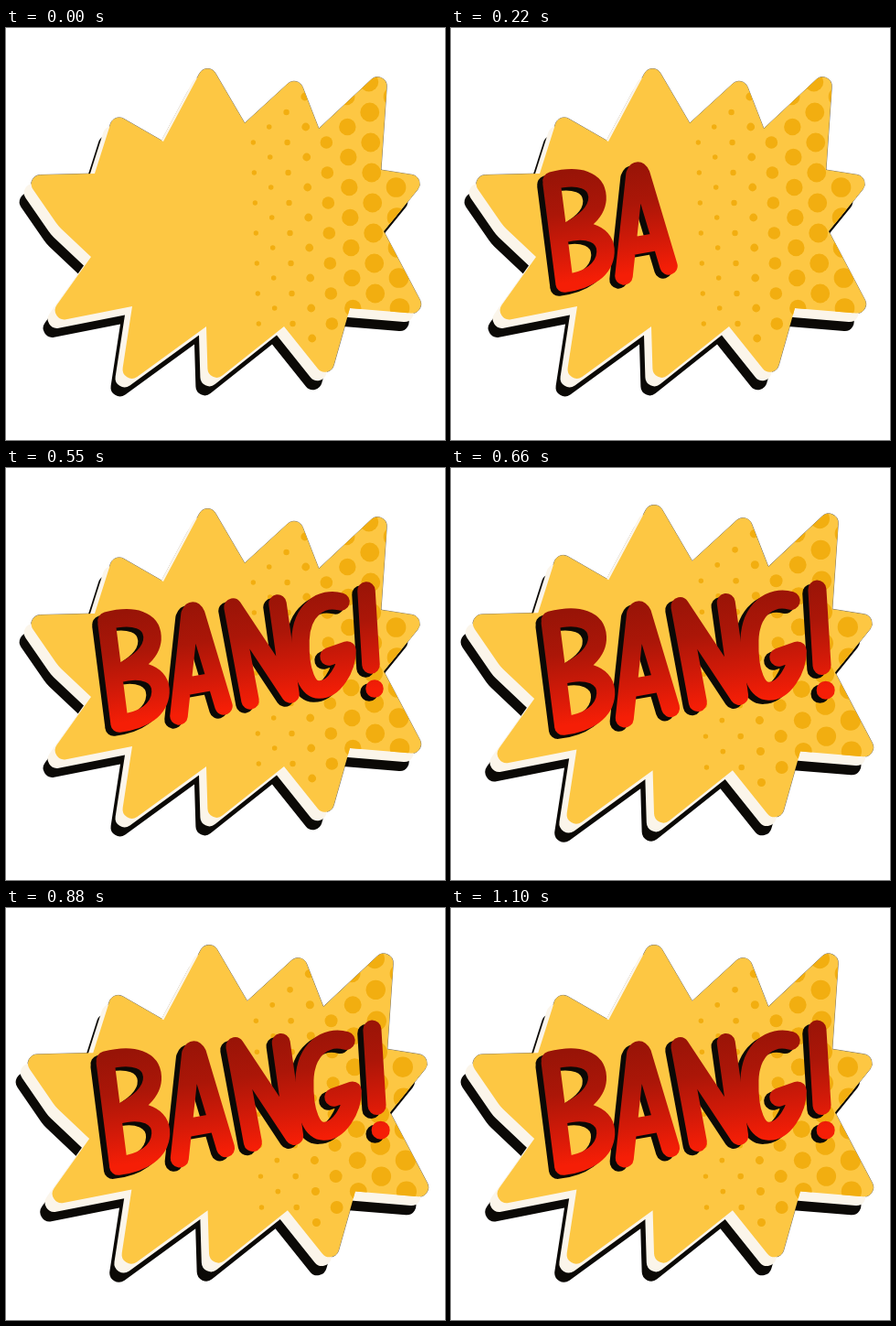
Recreate the animation shown at these times as an HTML page. Size 480x450 px, loop 1210 ms.

```html
<!DOCTYPE html>
<html lang="en">
<head>
<meta charset="utf-8">
<title>Comic burst</title>
<style>
  html, body { margin: 0; width: 100%; height: 100%; overflow: hidden; background: #fff; }
  svg { display: block; width: 100%; height: 100%; }
  .ink path { fill: none; stroke-width: 19.5; stroke-linecap: round; stroke-linejoin: round; }
</style>
</head>
<body>
<svg viewBox="0 0 480 450" role="img" aria-label="BANG!">
  <defs>
    <path id="burst"/>
    <clipPath id="inside"><use href="#burst"/></clipPath>
    <linearGradient id="red" gradientUnits="userSpaceOnUse" x1="109" y1="160" x2="126" y2="285">
      <stop offset="0" stop-color="#981407"/>
      <stop offset=".35" stop-color="#ab1608"/>
      <stop offset=".7" stop-color="#d51a08"/>
      <stop offset=".95" stop-color="#f51e06"/>
    </linearGradient>
  </defs>
  <g id="scene">
    <use href="#burst" x="-13" y="19.5" fill="#0b0906"/>
    <use href="#burst" fill="none" stroke="#1c1405" stroke-width=".6"/>
    <use href="#burst" x="-8" y="9.5" fill="#fbf5ea"/>
    <use href="#burst" fill="#fdc743"/>
    <g id="dots" clip-path="url(#inside)" fill="#f2ae10"></g>
    <g id="shadows" class="ink" stroke="#0b0906" transform="translate(-6 4)"></g>
    <g id="letters" class="ink" stroke="url(#red)"></g>
  </g>
</svg>
<script>
const FRAME = 110, FRAMES = 11;
const PULSE_START = 6;
const BIG = "translate(161 183) scale(1.0275 1.029) translate(-161 -183)";
const TIP = 10;

const byId = id => document.getElementById(id);

// Clockwise corners: x, y and corner radius (valleys stay sharp)
const corners = [
  [220, 34, TIP], [261, 104], [319, 51, TIP], [342, 110],
  [418, 39, TIP], [410, 155], [461, 163, TIP], [413, 222],
  [461, 313, TIP], [376, 306], [353, 387, TIP], [304, 326],
  [221, 392, TIP], [219, 326], [124, 395, TIP], [138, 304],
  [41, 323, TIP], [93, 250], [57, 216, 40], [19, 161, TIP],
  [97, 159], [118, 93, TIP], [172, 124]
];

const strokes = [
  "M110 169 L124 278 M110 167 C141 159 159 167 160 184 S145 213 122 225 C150 217 170 226 169 245 S150 276 124 279",
  "M189 271 L201 160 Q204 152 208 160 L238 260 M194 239 L228 233",
  "M267 254 L248 152 L311 247 L297 148",
  "M366 146 C345 140 323 155 322 188 C321 225 331 243 343 242 C358 242 373 220 373 199 L353 206",
  "M394 134 L399 215 M403 241 h.01"
];

function roundedPath(points) {
  const towards = ([x, y], [tx, ty], dist) => {
    const k = dist / Math.hypot(tx - x, ty - y);
    return [x + (tx - x) * k, y + (ty - y) * k];
  };
  const parts = points.map((p, i) => {
    const [x, y, r = 0] = p;
    if (!r) return `L${x} ${y}`;
    const prev = points.at(i - 1), next = points[(i + 1) % points.length];
    const angle = Math.atan2(prev[1] - y, prev[0] - x) - Math.atan2(next[1] - y, next[0] - x);
    const cut = r / Math.abs(Math.tan(angle / 2));
    return `L${towards(p, prev, cut)}A${r} ${r} 0 0 1 ${towards(p, next, cut)}`;
  });
  return "M" + parts.join("").slice(1) + "Z";
}

// Staggered halftone columns that tighten and shrink towards the left
function halftone() {
  let dots = "";
  for (let col = 0; col < 8; col++) {
    const x = 427 - 27 * col + 0.7 * col * col;
    const r = 2.6 + 8.4 / (1 + Math.exp(1.3 * (col - 3)));
    for (let y = col % 2 ? 59 : 75; y < 350; y += 33) {
      dots += `<circle cx="${x + (y - 190) * 0.03}" cy="${y}" r="${r}"/>`;
    }
  }
  return dots;
}

byId("burst").setAttribute("d", roundedPath(corners));
byId("dots").innerHTML = halftone();
const layers = [byId("shadows"), byId("letters")];
for (const layer of layers) layer.innerHTML = strokes.map(d => `<path d="${d}"/>`).join("");

const scene = byId("scene");
const start = performance.now();

function draw(ms) {
  const step = Math.floor(ms / FRAME) % FRAMES;
  for (const layer of layers) {
    [...layer.children].forEach((letter, i) => {
      letter.style.display = i < step ? "" : "none";
    });
  }
  const big = step >= PULSE_START && (step - PULSE_START) % 2 === 0;
  scene.setAttribute("transform", big ? BIG : "");
}

function tick() {
  draw(performance.now() - start);
  requestAnimationFrame(tick);
}
tick();
</script>
</body>
</html>
```
